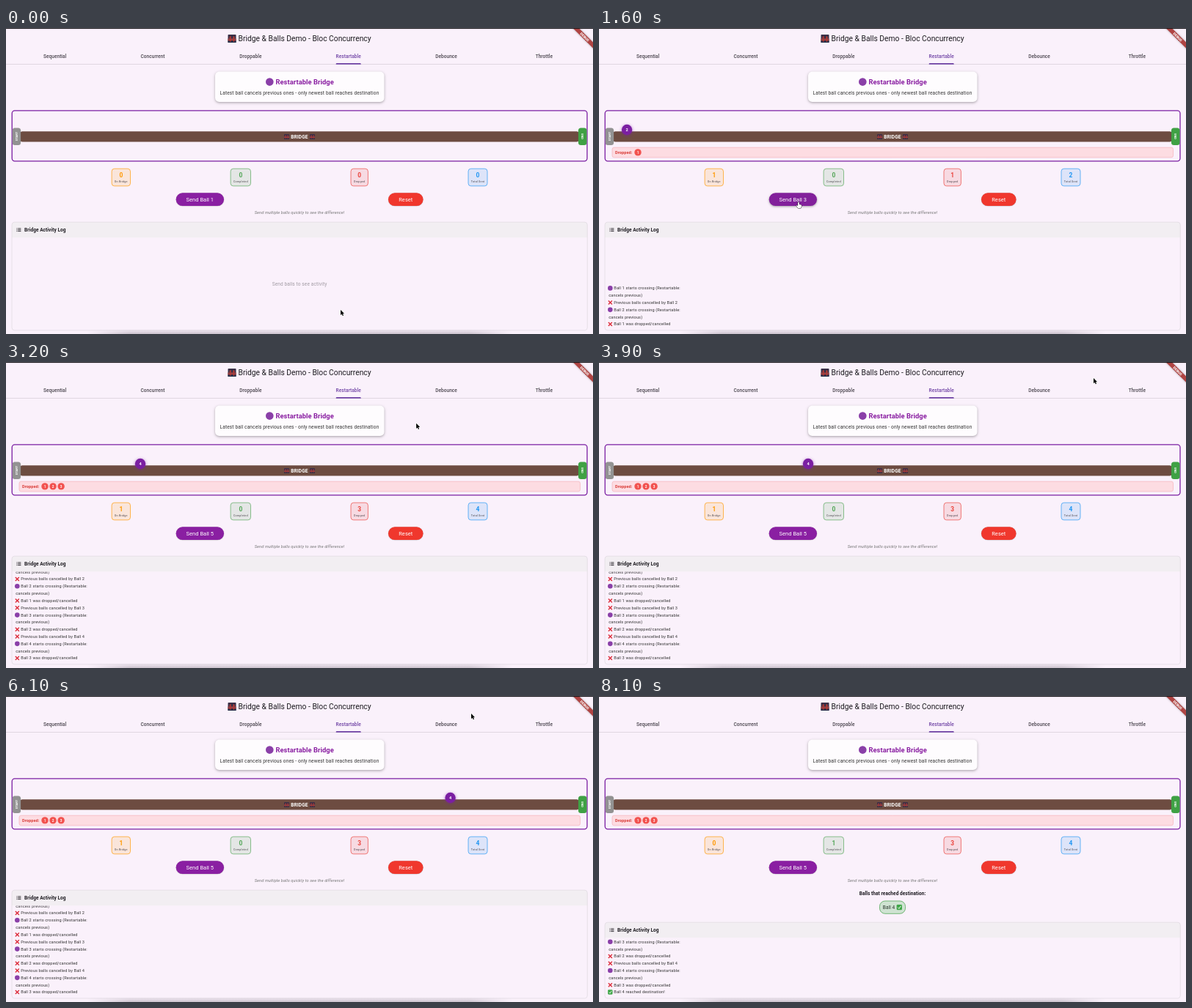
Animation of 800x418 px, one loop 8.2 s. Source, as an HTML page with a canvas:

```html
<!DOCTYPE html>
<html lang="en">
<head>
<meta charset="utf-8">
<title>Bridge &amp; Balls Demo</title>
<style>
html, body { margin: 0; width: 100%; height: 100%; overflow: hidden; background: #faf1fb; }
canvas { display: block; width: 800px; height: 418px; }
</style>
</head>
<body>
<canvas id="stage"></canvas>
<script>
const W = 800, H = 418, LOOP = 8200, STEP = 100;
const U = 0.4678; // one layout unit in stage pixels
const FONT = 'Roboto, "Noto Sans", sans-serif';
const PURPLE = '#8a1fa2', DEEP = '#7b1fa2', INK = '#1d1b20';
const STARTS = [1250, 1476, 1780, 2081];
const SPEED = 0.1457, FIRST_X = 20, LAST_X = 763, DONE = 7260;
const LINE = 9.82;

const canvas = document.getElementById('stage');
const ratio = window.devicePixelRatio || 1;
canvas.width = W * ratio;
canvas.height = H * ratio;
const c = canvas.getContext('2d');

// y is the middle of the capital letters, size is in layout units
function text(s, x, y, size, color, o = {}) {
  const px = size * U;
  c.font = `${o.style || 'normal'} ${o.weight || 400} ${px}px ${FONT}`;
  c.letterSpacing = (o.gap || 0) + 'px';
  c.textAlign = o.align || 'left';
  c.fillStyle = color;
  c.fillText(s, x, y + px * 0.355);
}
const mid = (s, x, y, size, color, o = {}) => text(s, x, y, size, color, { ...o, align: 'center' });

function box(x, y, w, h, r, fill, stroke, line = 1) {
  c.beginPath();
  c.roundRect(x, y, w, h, r);
  if (fill) { c.fillStyle = fill; c.fill(); }
  if (stroke) { c.strokeStyle = stroke; c.lineWidth = line; c.stroke(); }
}

function disc(x, y, r, fill) {
  c.beginPath();
  c.arc(x, y, r, 0, Math.PI * 2);
  c.fillStyle = fill;
  c.fill();
}

function path(points, color, width) {
  c.beginPath();
  points.forEach(([x, y]) => c.lineTo(x, y));
  c.strokeStyle = color;
  c.lineWidth = width;
  c.stroke();
}

function shadowed(color, blur, dy, draw) {
  c.save();
  c.shadowColor = color;
  c.shadowBlur = blur * ratio;
  c.shadowOffsetY = dy * ratio;
  draw();
  c.restore();
}

function cross(x, y) {
  path([[x - 2.5, y - 2.5], [x + 2.5, y + 2.5]], '#dd2e3c', 1.4);
  path([[x + 2.5, y - 2.5], [x - 2.5, y + 2.5]], '#dd2e3c', 1.4);
}

function tick(x, y, s) {
  box(x - s / 2, y - s / 2, s, s, s * 0.18, '#3fa648');
  path([[x - s * .27, y + s * .02], [x - s * .06, y + s * .25], [x + s * .29, y - s * .27]], '#fff', s * .13);
}

function nightBridge(x, y, s) {
  c.save();
  c.translate(x, y);
  c.scale(s, s);
  box(0, 0, 1, 1, 0.06, '#3a3047');
  c.fillStyle = '#27304a';
  c.fillRect(0, 0.74, 1, 0.26);
  c.fillStyle = '#7a4653';
  c.fillRect(0, 0.5, 1, 0.16);
  c.fillStyle = '#c83a30';
  c.fillRect(0, 0.66, 1, 0.09);
  c.fillRect(0.25, 0.2, 0.09, 0.7);
  c.fillRect(0.68, 0.2, 0.09, 0.7);
  c.beginPath();
  c.moveTo(0, 0.6);
  c.quadraticCurveTo(0.2, 0.5, 0.29, 0.24);
  c.quadraticCurveTo(0.5, 0.95, 0.72, 0.24);
  c.quadraticCurveTo(0.82, 0.5, 1, 0.6);
  c.strokeStyle = '#c83a30';
  c.lineWidth = 0.06;
  c.stroke();
  c.restore();
}

function header() {
  c.fillStyle = '#faf1fb';
  c.fillRect(0, 0, W, H);
  nightBridge(302.5, 9, 11);
  text('Bridge & Balls Demo - Bloc Concurrency', 316.6, 14.4, 22, INK);
  const tabs = ['Sequential', 'Concurrent', 'Droppable', 'Restartable', 'Debounce', 'Throttle'];
  tabs.forEach((name, i) => {
    mid(name, W / 6 * (i + .5), 38.5, 14, i === 3 ? '#6f42a5' : '#4a454e', { weight: 500, gap: .04 });
  });
  c.fillStyle = '#cfc5d1';
  c.fillRect(0, 49.3, W, .6);
  box(449.7, 48.1, 34, 1.6, [1, 1, 0, 0], '#6f42a5');

  shadowed('rgba(0,0,0,.32)', 3.5, 1.2, () => box(285, 59.5, 230.5, 41.5, 5.6, '#fefcfe'));
  disc(359.3, 73.6, 5.3, '#8a3fa8');
  text('Restartable Bridge', 367.5, 73.6, 20, PURPLE, { weight: 700, gap: .05 });
  mid('Latest ball cancels previous ones - only newest ball reaches destination', 400, 89, 14, '#333', { gap: .14 });
}

function sideLabel(s, x, turn) {
  c.save();
  c.translate(x, 148);
  c.rotate(turn);
  mid(s, 0, 0, 8.6, '#fff', { weight: 700 });
  c.restore();
}

function ball(n, x) {
  shadowed('rgba(123,31,162,.6)', 4.5, .9, () => disc(x, 139, 7.2, DEEP));
  mid(n, x, 139.2, 12, '#fff', { weight: 700 });
}

function bridge(s) {
  box(8.2, 112.8, 783.8, 69, 3.8, null, DEEP, 1.3);
  box(18.7, 141.3, 762.6, 14.1, 4, '#6d4c41');
  nightBridge(379, 145, 7);
  mid('BRIDGE', 399.9, 148.4, 14, '#fff', { weight: 700, gap: .1 });
  nightBridge(414, 145, 7);
  box(8.6, 136.4, 11.5, 23.6, 3.5, '#929292');
  box(780, 136.4, 11.5, 23.6, 3.5, '#3fa144');
  sideLabel('START', 14.2, -Math.PI / 2);
  sideLabel('END', 785.8, Math.PI / 2);
  if (s.dropped) {
    box(18, 163.2, 764.5, 13.6, 2.5, '#fddce2', '#f3aab0', .6);
    text('Dropped:', 22, 170, 12, '#d93a36', { weight: 700, gap: .07 });
    for (let i = 0; i < s.dropped; i++) {
      disc(53 + i * 11.05, 169.9, 4.7, '#f2524f');
      mid(i + 1, 53 + i * 11.05, 170, 10, '#fff', { weight: 700 });
    }
  }
  if (s.active) ball(s.sent, s.x);
}

function stat(x, w, value, label, rgb) {
  box(x - w / 2, 192.2, w, 23.6, 3.7, `rgba(${rgb},.13)`, `rgba(${rgb},.75)`, .9);
  mid(value, x, 201.4, 18, `rgb(${rgb})`, { weight: 700 });
  mid(label, x, 209.3, 8, '#4b464d', { gap: .18 });
}

function button(x, w, label, fill, lift) {
  shadowed('rgba(0,0,0,.35)', lift ? 3 : 1, lift ? 1 : .3, () => box(x, 225.3, w, 17.7, 8.85, fill));
  mid(label, x + w / 2, 234.2, 16, '#fff', { gap: .05 });
}

function controls(s) {
  stat(156.8, 25.4, s.active, 'On Bridge', '255,152,0');
  stat(319.8, 27.4, s.done, 'Completed', '84,166,88');
  stat(481.7, 23.4, s.dropped, 'Dropped', '234,67,60');
  stat(643, 26, s.sent, 'Total Sent', '33,150,243');
  button(231.7, 65.3, 'Send Ball ' + (s.sent + 1), s.hover ? '#82209b' : PURPLE, s.hover);
  button(521, 47.5, 'Reset', '#f0372d', false);
  mid('Send multiple balls quickly to see the difference!', 400, 251.6, 12, '#757575', { style: 'italic', gap: .12 });
  if (s.done) {
    mid('Balls that reached destination:', 400, 269.5, 14, INK, { weight: 700, gap: .04 });
    box(382.5, 280, 35, 17.3, 7.4, '#cfe3d2', '#55a95a', .8);
    text('Ball 4', 386.8, 288.7, 14, '#26332a', { gap: .06 });
    tick(409.3, 288.7, 7.3);
  }
}

function logLines(s) {
  const lines = [];
  for (let n = 1; n <= s.sent; n++) {
    if (n > 1) lines.push([cross, `Previous balls cancelled by Ball ${n}`]);
    lines.push([(x, y) => disc(x, y, 3.3, '#8a3fa8'), `Ball ${n} starts crossing (Restartable:`]);
    lines.push([null, 'cancels previous)']);
    if (n > 1) lines.push([cross, `Ball ${n - 1} was dropped/cancelled`]);
  }
  if (s.done) lines.push([(x, y) => tick(x, y, 6.4), 'Ball 4 reached destination!']);
  return lines.reverse();
}

function activity(s) {
  const top = s.done ? 309.2 : 265.2;
  box(8, top, 784.3, 21, [3.7, 3.7, 0, 0], '#f2eef2');
  box(8, top, 784.3, 413 - top, 3.7, null, '#ded8e0', .7);
  c.fillStyle = '#3a373c';
  for (let i = 0; i < 3; i++) {
    c.fillRect(14.4, top + 8.2 + i * 1.85, 1, 1);
    c.fillRect(16.2, top + 8.2 + i * 1.85, 4.2, 1);
  }
  text('Bridge Activity Log', 25, top + 10.4, 14, INK, { weight: 700, gap: .04 });
  if (!s.sent) {
    mid('Send balls to see activity', 400, 349.6, 14, '#a29ca4', { gap: .117 });
    return;
  }
  c.save();
  c.beginPath();
  c.rect(8, top + 21.2, 784, 391 - top);
  c.clip();
  logLines(s).forEach(([icon, line], i) => {
    const y = 404.5 - i * LINE;
    if (icon) icon(15.3, y);
    text(line, icon ? 20.3 : 13.2, y, 12, '#333', { gap: .13 });
  });
  c.restore();
}

function chrome() {
  c.save();
  c.beginPath();
  c.rect(0, 1, W, H);
  c.clip();
  c.translate(W, 1);
  c.rotate(Math.PI / 4);
  shadowed('rgba(0,0,0,.4)', 2.5, 0, () => {
    c.fillStyle = '#b04443';
    c.fillRect(-22, 13.1, 44, 5.7);
  });
  mid('DEBUG', 0, 16, 10.2, '#fff', { weight: 900 });
  c.restore();
  c.fillStyle = '#1c1b1e';
  c.fillRect(0, 0, W, 1.1);

  // soft shade along the lower edge
  for (let i = 0; i < 6; i++) {
    const g = c.createLinearGradient(110, 0, 690, 0);
    const shade = `rgba(40,30,45,${.035 * (i + 1)})`;
    g.addColorStop(0, 'rgba(40,30,45,0)');
    g.addColorStop(.1, shade);
    g.addColorStop(.9, shade);
    g.addColorStop(1, 'rgba(40,30,45,0)');
    c.fillStyle = g;
    c.fillRect(110, 412 + i, 580, 1);
  }
}

// time, x, y of the pointer tip
const TRACK = [
  [50, 456, 385], [200, 272, 238], [2650, 272, 238], [3500, 674, 22],
  [4000, 674, 22], [4500, 634, 24], [7650, 634, 24], [7950, 640, -14]
];

function pointerAt(t) {
  let i = TRACK.findIndex(k => k[0] > t);
  if (i < 0) i = TRACK.length;
  const a = TRACK[Math.max(0, i - 1)], b = TRACK[Math.min(i, TRACK.length - 1)];
  const p = a === b ? 0 : (t - a[0]) / (b[0] - a[0]);
  const e = p * p * (3 - 2 * p);
  return [a[1] + (b[1] - a[1]) * e, a[2] + (b[2] - a[2]) * e];
}

function pointer([x, y], hand) {
  const shape = new Path2D(hand
    ? 'M-.9 .2Q0-.8 .8 .2V3L3.4 3.6Q4.3 4 4 5.2L3.2 8H-.8L-3 5Q-3.2 4-2 4.2L-.9 5Z'
    : 'M0 0V7.2L1.7 5.7L2.8 8.2L4 7.7L2.9 5.2H5.1Z');
  c.save();
  c.translate(x, y);
  c.lineJoin = 'round';
  c.lineWidth = hand ? .9 : 1.2;
  c.strokeStyle = hand ? '#111' : '#fff';
  c.fillStyle = hand ? '#fff' : '#000';
  c.stroke(shape);
  c.fill(shape);
  c.restore();
}

function stateAt(t) {
  const sent = STARTS.filter(at => at <= t).length;
  const done = t >= DONE ? 1 : 0;
  const [px, py] = pointerAt(t);
  return {
    sent, done,
    active: sent && !done ? 1 : 0,
    dropped: Math.max(0, sent - 1),
    x: sent ? Math.min(LAST_X, FIRST_X + (t - STARTS[sent - 1]) * SPEED) : 0,
    hover: px > 231 && px < 297 && py > 225 && py < 243
  };
}

function draw(t) {
  const s = stateAt(t);
  c.setTransform(ratio, 0, 0, ratio, 0, 0);
  header();
  bridge(s);
  controls(s);
  activity(s);
  chrome();
  pointer(pointerAt(t), s.hover);
}

function tickFrame() {
  const t = performance.now() % LOOP;
  draw(Math.floor(t / STEP) * STEP);
  requestAnimationFrame(tickFrame);
}
tickFrame();
</script>
</body>
</html>
```
